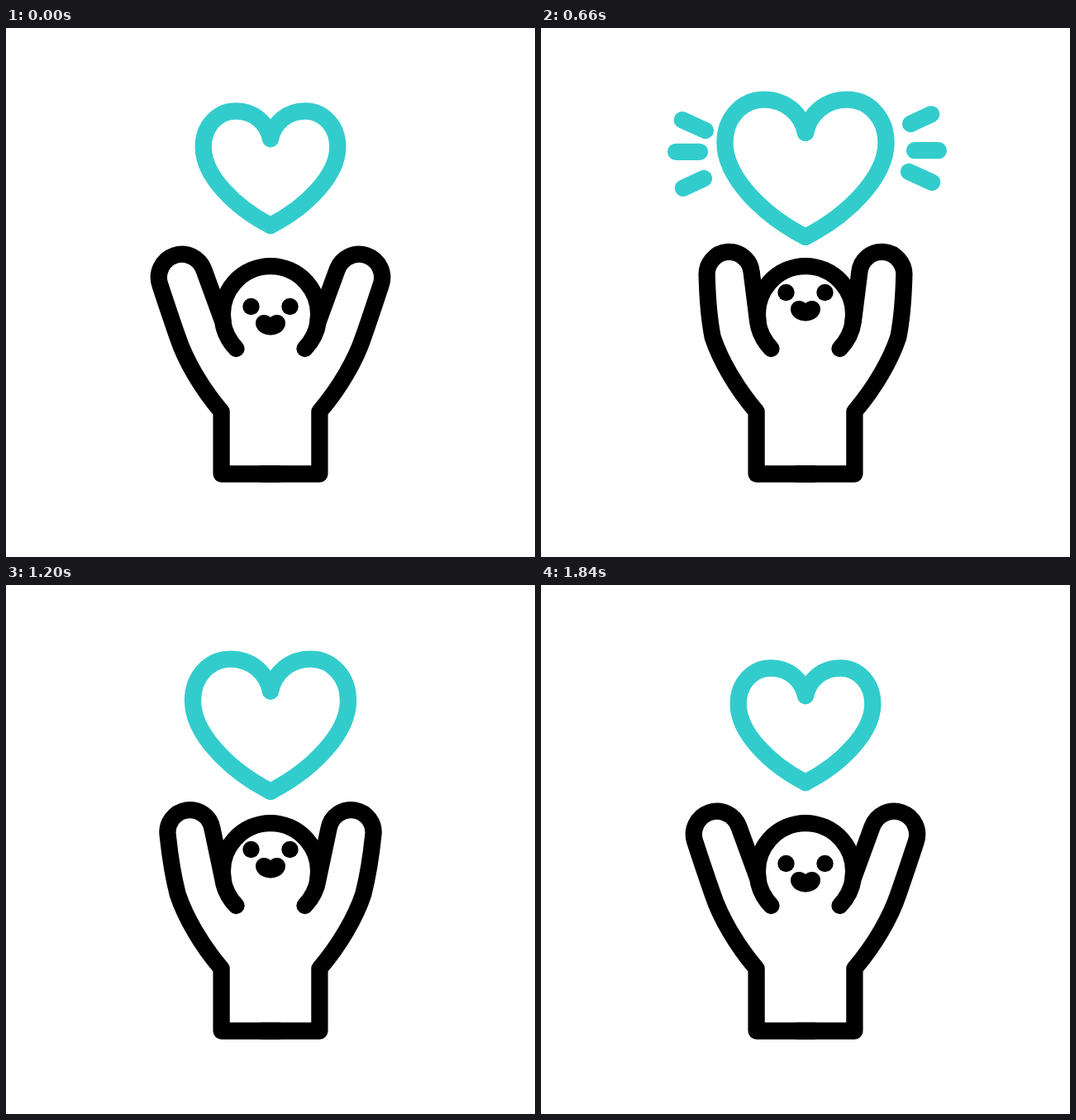
Write an HTML page that moves like this. It is 640 px wide and 640 px high and loops after 2.4 s.

```html
<!DOCTYPE html>
<html>
<head>
<meta charset="utf-8">
<style>
  html, body { margin: 0; width: 100%; height: 100%; overflow: hidden; background: #fff; }
  svg { display: block; width: 100%; height: 100%; }
  .line { fill: none; stroke: #000; stroke-width: 20.3; stroke-linecap: round; stroke-linejoin: round; }
  .teal { stroke: #3cc; }
  #heart { vector-effect: non-scaling-stroke; }
</style>
</head>
<body>
<svg viewBox="0 0 640 640">
  <path class="line" d="M262.6 354.5A58 58 0 1 1 377.4 354.5"/>
  <g id="half">
    <path id="heart" class="line teal" d="M320 134C316 115 300 100.5 278 100.5C256 100.5 238.7 119 238.7 144C238.7 178 276 216.5 320 239"/>
    <path id="arm" class="line"/>
    <g id="face">
      <circle cx="296.5" cy="337" r="10.2"/>
      <path d="M320.3 350.3C318.5 348.3 315.5 347 312 347C306.3 347 302 351.5 302 357C302 366 311 371.6 320.3 371.6Z"/>
    </g>
  </g>
  <use href="#half" transform="matrix(-1 0 0 1 640 0)"/>
  <g id="sparks" class="line teal">
    <path pathLength="1" d="M199 124L143.5 99"/>
    <path pathLength="1" d="M192 149.8H135.3"/>
    <path pathLength="1" d="M197 182L147.5 205"/>
  </g>
  <use href="#sparks" transform="rotate(180 322 149)"/>
</svg>
<script>
const LOOP = 2400;
const $ = id => document.getElementById(id);
const mix = (a, b, p) => a + (b - a) * p;

// The arm swings between wide open (p = 0) and upright (p = 1).
function armPath(p) {
  const at = (x0, y0, x1, y1) => mix(x0, x1, p) + ' ' + mix(y0, y1, p);
  return 'M278.5 388C269 378 264 368 262.2 355' +
    'L' + at(239.4, 292.6, 256.9, 296.5) +
    'A1 1 0 0 0 ' + at(186.4, 310.9, 202.7, 298.5) +
    'C' + at(193, 331, 202.7, 330) + ' ' + at(201, 355, 204.5, 356) + ' 207.7 374' +
    'C217 402 236 435 260.6 464V539.5H330';
}

function draw(t) {
  // Smooth step from 0 to 1 between two times.
  const ease = (from, to) => {
    const x = Math.min(1, Math.max(0, (t - from) / (to - from)));
    return (1 - Math.cos(Math.PI * x)) / 2;
  };

  const swell = ease(375, 655) - ease(655, 935) + ease(935, 1275);
  const size = 1 - .19 * ease(0, 375) + .39 * swell - .2 * ease(1275, 1540);
  $('heart').setAttribute('transform', `translate(320 170) scale(${size}) translate(-320 -170)`);

  const raise = ease(0, 470) - ease(570, 970) + ease(970, 1390) - ease(1440, 1840);
  $('arm').setAttribute('d', armPath(raise));

  const look = ease(0, 550) - ease(1400, 1840);
  $('face').setAttribute('transform', `translate(0 ${-17 * look})`);

  // The sparks shoot out: the tail follows the head along each ray.
  const head = ease(560, 760), tail = ease(660, 890);
  const sparks = $('sparks');
  sparks.setAttribute('visibility', head > tail ? 'visible' : 'hidden');
  sparks.setAttribute('stroke-dasharray', `${head - tail} 3`);
  sparks.setAttribute('stroke-dashoffset', -tail);
}

const start = performance.now();
function tick() {
  draw((performance.now() - start) % LOOP);
  requestAnimationFrame(tick);
}
tick();
</script>
</body>
</html>
```
